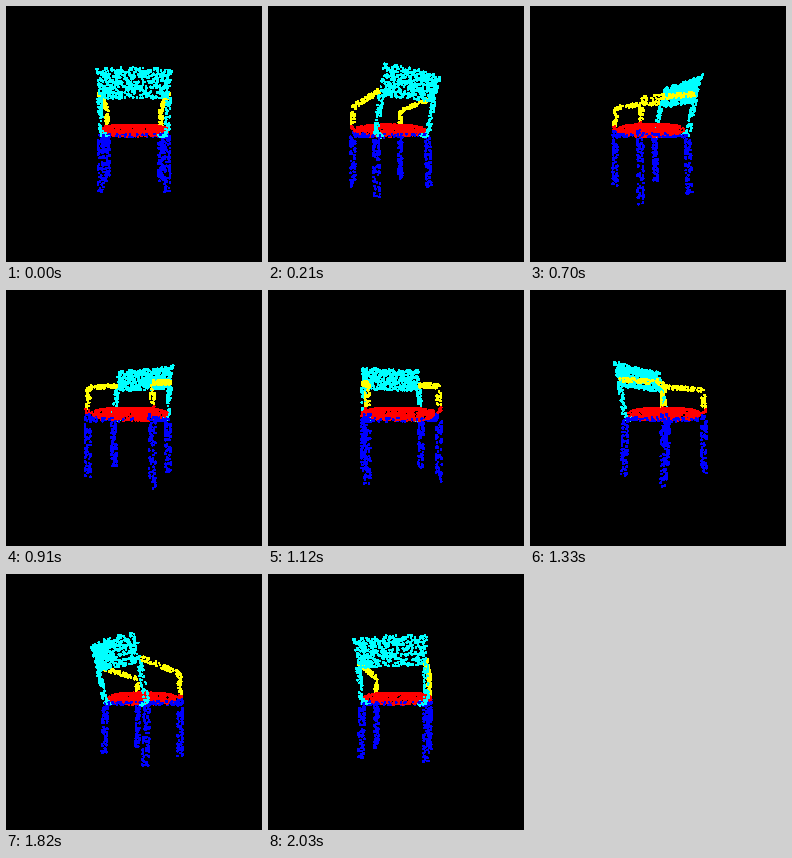
These frames come from a looping animation (256 by 256 pixels, 2.1 s). A matplotlib script:

```python
import numpy as np
import matplotlib.pyplot as plt
from matplotlib.animation import FuncAnimation

SIZE, DPI = 256, 100
FRAMES, STEP = 30, 70
DIST = 210          # camera distance, in stage pixels
DOT = 1.65          # dot diameter, in pixels

CYAN, RED, BLUE, YELLOW = (0, 1, 1), (1, 0, 0), (0, 0, 1), (1, 1, 0)
rng = np.random.default_rng(7)
parts, tints = [], []


def add(pts, color):
    parts.append(pts)
    tints.append(np.tile(color, (len(pts), 1)))


def tube(path, n, r, color):
    """Scatter n points over the skin of a tube along a polyline."""
    path = np.array(path, float)
    seg = np.linalg.norm(np.diff(path, axis=0), axis=1)
    run = np.concatenate([[0], np.cumsum(seg)])
    t = rng.uniform(0, run[-1], n)
    axis = np.column_stack([np.interp(t, run, path[:, k]) for k in range(3)])
    k = np.clip(np.searchsorted(run, t) - 1, 0, len(seg) - 1)
    d = (np.diff(path, axis=0) / seg[:, None])[k]
    skin = rng.normal(size=(n, 3))
    skin -= (skin * d).sum(1, keepdims=True) * d
    skin /= np.linalg.norm(skin, axis=1, keepdims=True)
    add(axis + r * skin, color)


def lean(y):
    return 13 + 15 * y / 56


def backrest(n):
    y = rng.uniform(31, 56, n)
    u = rng.uniform(-1, 1, n)
    x = u * (31 + 2 * (y - 31) / 25)
    z = lean(y) + 5.5 * (1 - u ** 2) + rng.choice([-1.5, 1.5], n)
    add(np.column_stack([x, y, z]), CYAN)


def seat(n, mid, swell):
    u, v = rng.uniform(-1, 1, (2, n))
    e = np.abs(u) ** 3 + v ** 4
    u, v, e = u[e < 1], v[e < 1], e[e < 1]
    y = mid + swell(len(e)) * np.sqrt(1 - e)
    add(np.column_stack([34.5 * u, y, -10 + 26 * v]), RED)


# Axes: x right, y up, z from the front of the chair to its back
backrest(520)
seat(430, 4, lambda n: np.full(n, 5.2))
seat(330, 3, lambda n: rng.uniform(-6, 3, n))

for s in (-1, 1):
    x = 31 * s
    tube([(x, 4, -34), (x, -55, -34)], 85, 2.5, BLUE)
    tube([(x, 0, 13), (x, -54, 15)], 85, 2.7, BLUE)
    tube([(x, -1, -32), (x, -1, 13)], 25, 1.5, BLUE)
    tube([(x, 32, lean(32)), (x, -1, 13), (x - 8 * s, -1, 13)], 60, 2, CYAN)
    tube([(x, 36.5, 20), (x, 29, -29), (x, 26, -33), (x, 8, -34)],
         95, 1.9, YELLOW)
    tube([(x, 9, -34), (x, 4, -34)], 10, 2, RED)
for z in (-34, 14):
    tube([(-29, -1.5, z), (29, -1.5, z)], 22, 1.5, BLUE)

cloud, tints = np.vstack(parts), np.vstack(tints)

fig = plt.figure(figsize=(SIZE / DPI, SIZE / DPI), dpi=DPI, facecolor="black")
ax = fig.add_axes([0, 0, 1, 1])
ax.set(xlim=(0, SIZE), ylim=(SIZE, 0))
ax.axis("off")
dots = ax.scatter(cloud[:, 0], cloud[:, 1], s=(DOT * 72 / DPI) ** 2,
                  c=tints, linewidths=0, antialiaseds=False)


def draw(i):
    a = 2 * np.pi * i / FRAMES
    x, y, z = cloud.T
    depth = z * np.cos(a) - x * np.sin(a)
    scale = 1 / (1 - depth / DIST)
    px = SIZE / 2 + (x * np.cos(a) + z * np.sin(a)) * scale
    py = SIZE / 2 - y * scale
    order = np.argsort(depth)
    dots.set_offsets(np.column_stack([px, py])[order])
    dots.set_facecolors(tints[order])
    return [dots]


anim = FuncAnimation(fig, draw, frames=FRAMES, interval=STEP, repeat=True,
                     repeat_delay=0, blit=False)
plt.show()
```
